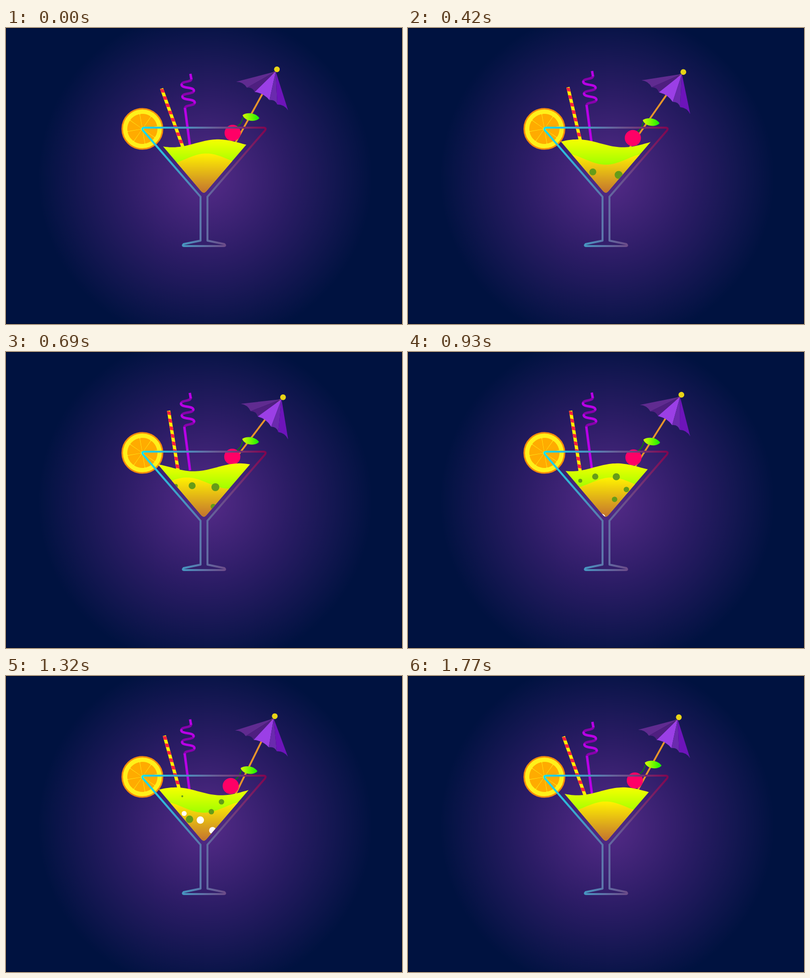
Write an HTML page that moves like this. It is 800 by 600 pixels and loops after 1800 ms.

```html
<!DOCTYPE html>
<html lang="en">
<head>
<meta charset="utf-8">
<title>Cocktail</title>
<style>
html, body { margin: 0; width: 100%; height: 100%; overflow: hidden; background: #001240; }
svg { display: block; width: 800px; height: 600px; }
</style>
</head>
<body>
<svg viewBox="0 0 800 600">
  <defs>
    <radialGradient id="night" gradientUnits="userSpaceOnUse" cx="402" cy="303" r="338">
      <stop offset="0" stop-color="#562b89"/>
      <stop offset=".5" stop-color="#2b1c65"/>
      <stop offset="1" stop-color="#001240"/>
    </radialGradient>
    <linearGradient id="rim" gradientUnits="userSpaceOnUse" x1="275" y1="0" x2="525" y2="0">
      <stop offset="0" stop-color="#14e0f4"/>
      <stop offset=".5" stop-color="#6070a6"/>
      <stop offset="1" stop-color="#82054f"/>
    </linearGradient>
    <linearGradient id="lime" gradientUnits="userSpaceOnUse" x1="0" y1="226" x2="0" y2="277">
      <stop offset="0" stop-color="#f6ff00"/>
      <stop offset="1" stop-color="#a0ff00"/>
    </linearGradient>
    <linearGradient id="amber" gradientUnits="userSpaceOnUse" x1="0" y1="255" x2="0" y2="334">
      <stop offset="0" stop-color="#fff200"/>
      <stop offset="1" stop-color="#c4732f"/>
    </linearGradient>
    <linearGradient id="leaf">
      <stop offset="0" stop-color="#dcff00"/>
      <stop offset="1" stop-color="#10f000"/>
    </linearGradient>
    <clipPath id="bowl"><path d="M293.5 212L394.5 331Q400 337 405 330.5L506.5 212Z"/></clipPath>
  </defs>

  <rect width="800" height="600" fill="url(#night)"/>
  <rect x=".5" y=".5" width="799" height="599" fill="none" stroke="#000820" stroke-opacity=".7"/>

  <g transform="translate(275.5 204.5)">
    <circle r="40.8" fill="#fff01a" stroke="#f58a0c" stroke-width="3"/>
    <g id="slice" fill="#ffab00" stroke="#ffab00" stroke-width="3" stroke-linejoin="round"/>
  </g>

  <g id="straw">
    <rect x="-3.3" y="-77" width="6.6" height="132" fill="#ffee00"/>
    <path id="stripes" fill="#ff1f3d"/>
  </g>

  <g id="curly" fill="none" stroke-width="5" stroke-linecap="round">
    <path id="coilBack" stroke="#8600ac"/>
    <path id="coilFront" stroke="#b800e6"/>
    <path stroke="#b800e6" stroke-linecap="butt" d="M372.5 93L374.5 104M361.5 162L373 250"/>
  </g>

  <g id="umbrella">
    <path d="M-1.5 -95V90" stroke="#e8952a" stroke-width="3.6"/>
    <g id="canopy"/>
    <circle cy="-102" r="5.8" fill="#e8d416"/>
  </g>

  <g id="cherry">
    <path d="M9 -13Q18 -18 21 -32" fill="none" stroke="#117a10" stroke-width="2"/>
    <circle r="16.3" fill="#ff0066"/>
    <path d="M20 -36C27 -42 46 -42 54 -30C46 -21 25 -23 20 -36Z" fill="url(#leaf)"/>
  </g>

  <g clip-path="url(#bowl)">
    <path id="back" fill="url(#lime)"/>
    <path id="front" fill="url(#amber)"/>
    <g id="bubbles"/>
  </g>

  <path fill="none" stroke="url(#rim)" stroke-width="4" stroke-linejoin="round"
    d="M280 202H520Q527 202 523 208L407 342V431L441 438Q445 442 439 442H361Q355 442 359 438L393 431V342L277 208Q273 202 280 202Z"/>
</svg>

<script>
const LOOP = 1800, STEP = 30, TAU = Math.PI * 2;
const $ = id => document.getElementById(id);
const set = (el, attrs) => { for (const k in attrs) el.setAttribute(k, attrs[k]); };
const add = (parent, tag, attrs) => {
  const el = document.createElementNS('http://www.w3.org/2000/svg', tag);
  set(el, attrs);
  return parent.appendChild(el);
};
const clamp = v => Math.min(1, Math.max(0, v));

// Orange segments
for (let i = 0; i < 8; i++) {
  add($('slice'), 'path', {
    d: 'M4.5 0L27.4 -9.3A29 29 0 0 1 27.4 9.3Z',
    transform: `rotate(${i * 45 - 77.5})`
  });
}

// Slanted straw stripes
let stripes = '';
for (let y = -77; y < 50; y += 15.6) stripes += `M-3.3 ${y}l6.6 2.5v7.5l-6.6 -2.5z`;
set($('stripes'), { d: stripes });

// Coil: bends alternate right and left, narrower at both ends
const bend = i => 366 + 0.8 * i + (i % 2 ? -1 : 1) * (i % 5 ? 12 : 8.5);
const coil = ['', ''];
for (let i = 0; i < 5; i++) {
  const y = 103 + 12 * i, a = bend(i), b = bend(i + 1);
  coil[i % 2] += `M${a} ${y}C${a} ${y + 8} ${b} ${y + 4} ${b} ${y + 12}`;
}
set($('coilBack'), { d: coil[0] });
set($('coilFront'), { d: coil[1] });

// Umbrella: scalloped panels between neighbouring ribs
const ribs = [-60, -35, -17, 17, 35, 60];
['#602b90', '#4f1f80', '#9b3fe6', '#6a2aae', '#6d14ba'].forEach((fill, i) => {
  const a = ribs[i], b = ribs[i + 1];
  add($('canopy'), 'path', { d: `M0 -97L${a} -40Q${(a + b) / 2} -47 ${b} -40Z`, fill });
});

// Bubbles: a moment, the place at that moment and the radius
const bubble = (fill, pace) => ([time, x, y, r]) =>
  ({ time, x, y, r, rise: r * pace, el: add($('bubbles'), 'circle', { fill }) });
const bubbles = [
  ...[
    [690, 376, 271, 7], [690, 423, 274, 8], [930, 348, 261, 4],
    [1140, 438, 266, 5.5], [1140, 416, 286, 5.5], [1530, 373, 273, 7.5]
  ].map(bubble('#659c18', 11)),
  ...[[1140, 392, 312, 7.4], [1530, 416, 291, 7], [1530, 363, 263, 5]].map(bubble('#fff', 15))
];

const swing = (t, peak, period = LOOP) => Math.cos(TAU * (t - peak) / period);

function wave(mid, height, length, crest) {
  let d = 'M290 345';
  for (let x = 290; x <= 510; x += 4) {
    d += `L${x} ${(mid - height * Math.cos(TAU * (x - crest) / length)).toFixed(2)}`;
  }
  return d + 'L510 345Z';
}

function draw(t) {
  const turns = 2 * t / LOOP;
  set($('back'), { d: wave(233.8, 8, 185, 428.5 - 185 * turns) });
  set($('front'), { d: wave(265.7, 11.3, 170, 405 + 170 * turns) });

  const lean = 14.3 + 5.9 * swing(t, -90);
  set($('straw'), { transform: `translate(340.5 195) rotate(${-lean})` });

  const tilt = 30.9 + 5 * swing(t, 570) + 1.7 * swing(t, 680, LOOP / 2);
  set($('umbrella'), { transform: `translate(498 173) rotate(${tilt})` });

  const lift = 5.5 * (swing(t, -50) - 1);
  set($('curly'), { transform: `translate(${lift * 0.12} ${lift})` });

  const x = 455.7 - 2.4 * swing(t, 300, LOOP / 2) + swing(t, 0);
  const y = 217.4 + 6.6 * swing(t, 340, LOOP / 2);
  set($('cherry'), { transform: `translate(${x} ${y})` });

  // Bubbles drift to the middle and shrink near the surface or the end of the loop
  for (const b of bubbles) {
    const s = (t - b.time) / 1000, cy = b.y - b.rise * s;
    const size = clamp((cy - 233) / 22) * clamp((LOOP - STEP - t) / 200);
    set(b.el, { cx: b.x + (400 - b.x) * 0.4 * s, cy, r: b.r * size });
  }
}

function frame() {
  draw(Math.floor(performance.now() % LOOP / STEP) * STEP);
  requestAnimationFrame(frame);
}
frame();
</script>
</body>
</html>
```
